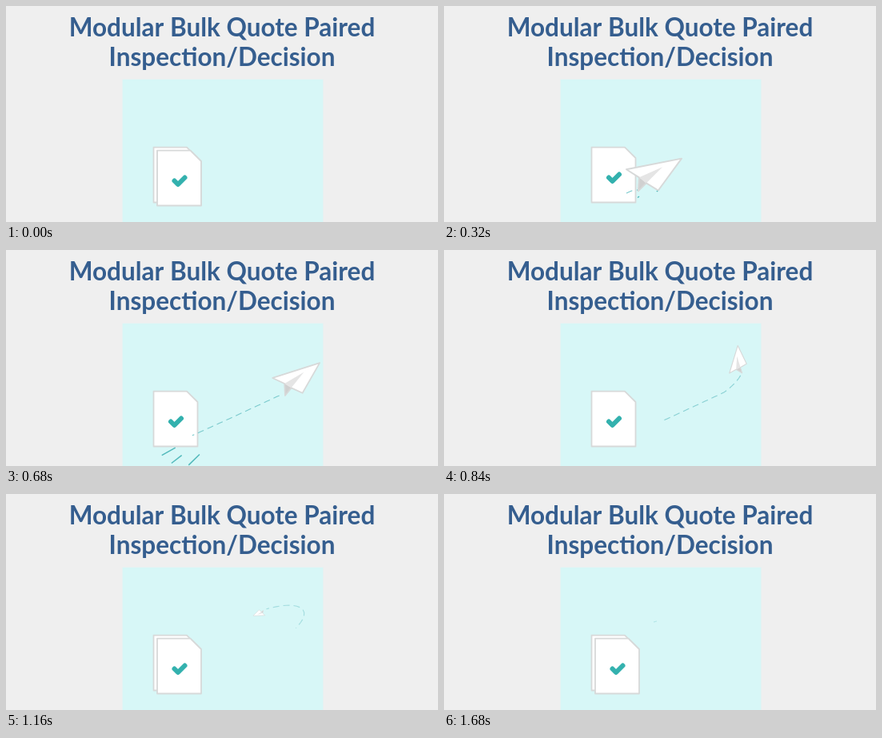
Animation, 540 px wide and 270 px high, one loop 2000 ms. Source, as an HTML page with a canvas:

```html
<!DOCTYPE html>
<html lang="en">
<head>
<meta charset="utf-8">
<title>Paper plane</title>
<style>
  html, body { margin: 0; width: 100%; height: 100%; overflow: hidden; background: #efefef; }
  canvas { display: block; width: 540px; height: 270px; }
</style>
</head>
<body>
<canvas id="stage" width="540" height="270"></canvas>
<script>
const ctx = document.getElementById('stage').getContext('2d');
const LOOP = 2000, STEP = 40, LAST = 1680, PLANE_END = 1640;
const FRONT = [4.5, 4];

const page = [[184.5, 176.6], [226, 176.6], [239.5, 190], [239.5, 245.5], [184.5, 245.5]];
const check = [[206, 214.5], [210.5, 219], [219, 210.5]];

// Tip, left wing, left notch, keel, right notch, right wing, around the keel.
const plane = [[54, -41], [-15, -27], [1, -17], [0, 0], [10, -10], [25, -1]];
const START_ANGLE = -0.43;

// Each speed line runs from its first point to its second.
const speedLines = [
  [[244, 229], [187, 261]],
  [[244, 238], [201, 271]],
  [[268, 230], [222, 275]]
];

const trail = document.createElementNS('http://www.w3.org/2000/svg', 'path');
trail.setAttribute('d', 'M228 234C266 217 316 194 350 178C372 162 382 144 362 140' +
  'C345 136 315 147 296 152C280 156 270 158 262 160');
const trailPoint = s => { const p = trail.getPointAtLength(s); return [p.x, p.y]; };

const ramp = (t, from, to) => Math.min(1, Math.max(0, (t - from) / (to - from)));
const smooth = u => u * u * (3 - 2 * u);
const mix = (a, b, k) => a.map((v, i) => v + (b[i] - v) * k);
const shift = (points, [dx, dy]) => points.map(([x, y]) => [x + dx, y + dy]);

// Distances along the trail: launch, turn, glide away.
const headAt = t => 133 * ramp(t, 270, 680) + 73 * ramp(t, 680, 1000) + 90 * ramp(t, 1000, PLANE_END);
const tailAt = t => 90 * ramp(t, 660, 1000) + 136 * ramp(t, 1000, 1360) + 60 * ramp(t, 1360, PLANE_END);

function trace(points, close) {
  ctx.beginPath();
  points.forEach(([x, y]) => ctx.lineTo(x, y));
  if (close) ctx.closePath();
}

function fill(points, color) {
  trace(points, true);
  ctx.fillStyle = color;
  ctx.fill();
}

function stroke(points, color, width, close) {
  trace(points, close);
  ctx.strokeStyle = color;
  ctx.lineWidth = width;
  ctx.stroke();
}

function drawCheck(offset) {
  ctx.lineCap = 'round';
  stroke(shift(check, offset), '#33b1ae', 6);
  ctx.lineCap = 'butt';
}

function drawPage(offset) {
  const outline = shift(page, offset);
  fill(outline, '#fff');
  stroke(outline, '#d7d9d9', 1.8, true);
  drawCheck(offset);
}

function drawTrail(t) {
  const end = headAt(t) - 4, tail = tailAt(t);
  ctx.globalAlpha = 1 - 0.6 * ramp(t, 680, 1360);
  for (let s = 0; s < end; s += 13) {
    const from = Math.max(s, tail), to = Math.min(s + 8, end);
    if (to > from) stroke([from, (from + to) / 2, to].map(trailPoint), '#7bcacd', 1.1);
  }
  ctx.globalAlpha = 1;
}

function drawSpeedLines(t) {
  const lead = ramp(t, 300, 740), rear = ramp(t, 510, 810);
  if (lead > rear) {
    for (const [a, b] of speedLines) stroke([mix(a, b, rear), mix(a, b, lead)], '#52b9bb', 1.5);
  }
}

function planePose(t, scale) {
  const head = headAt(t), [x, y] = trailPoint(head);
  const behind = trailPoint(head - 4), ahead = trailPoint(head + 6);
  const turn = Math.atan2(ahead[1] - behind[1], ahead[0] - behind[0]) - START_ANGLE;
  const cos = Math.cos(turn) * scale, sin = Math.sin(turn) * scale;
  return plane.map(([px, py]) => [x + px * cos - py * sin, y + 4 * scale + px * sin + py * cos]);
}

function drawPlane(t) {
  const scale = (1 - 0.78 * smooth(ramp(t, 560, 1040))) * (1 - ramp(t, 1040, PLANE_END) ** 2);
  const fold = smooth(ramp(t, 0, 280));
  const [topLeft, top, corner, bottomRight, bottomLeft] = shift(page, FRONT);
  const sheet = [corner, top, topLeft, mix(topLeft, bottomLeft, 0.5), bottomLeft, bottomRight];
  const pose = planePose(t, scale);
  const points = sheet.map((p, i) => mix(p, pose[i], fold));
  const [tip, , notchL, keel, notchR] = points;

  fill(points, '#fff');
  ctx.globalAlpha = fold;
  fill([notchL, mix(notchL, tip, 0.55), notchR], '#e5e5e5');
  fill([notchL, notchR, keel], '#d0d0d0');
  ctx.globalAlpha = 1;
  stroke(points, '#d7d9d9', 0.3 + 1.6 * scale, true);
  ctx.globalAlpha = 1 - ramp(t, 20, 150);
  drawCheck(FRONT);
  ctx.globalAlpha = 1;
}

function drawScene(t) {
  ctx.fillStyle = '#efefef';
  ctx.fillRect(0, 0, 540, 270);
  ctx.fillStyle = '#d7f7f7';
  ctx.fillRect(145.6, 91.7, 250.8, 179);

  ctx.fillStyle = '#355e8f';
  ctx.font = 'bold 31.5px Lato, sans-serif';
  ctx.textAlign = 'center';
  ctx.fillText('Modular Bulk Quote Paired', 270, 37.5);
  ctx.fillText('Inspection/Decision', 270, 74.5);

  ctx.lineJoin = 'round';
  drawPage([0, 0]);
  const slide = ramp(t, 840, 1120);
  if (slide > 0) drawPage(mix([0, 0], FRONT, slide));
  drawTrail(t);
  drawSpeedLines(t);
  if (t < PLANE_END) drawPlane(t);
}

function frame() {
  const t = performance.now() % LOOP;
  drawScene(Math.min(LAST, Math.floor(t / STEP) * STEP));
  requestAnimationFrame(frame);
}
frame();
</script>
</body>
</html>
```
